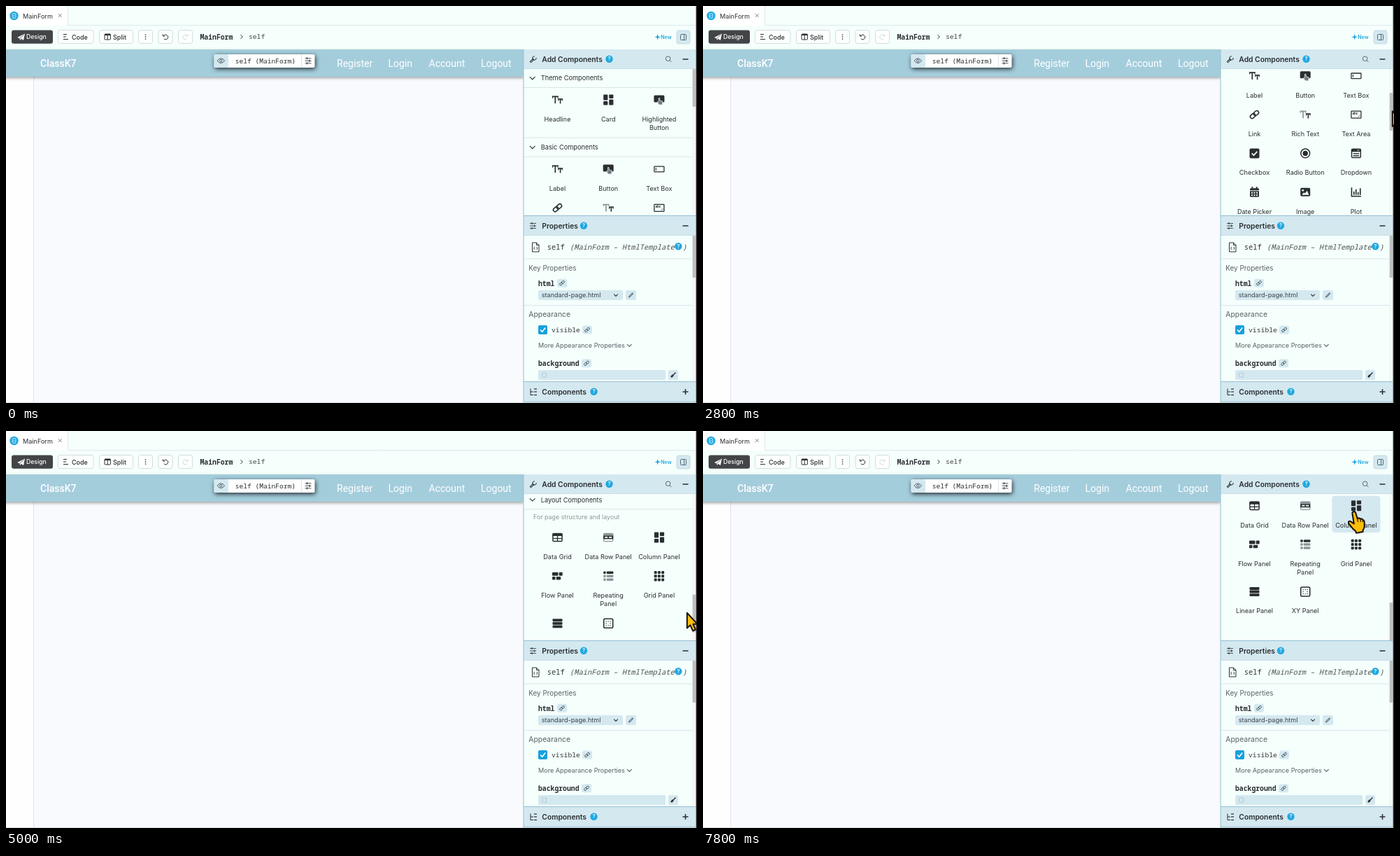
Animation of 988x567 px, one loop 8 s. Source, as an HTML page with a canvas:

```html
<!DOCTYPE html>
<html lang="en">
<head>
<meta charset="utf-8">
<title>Form designer</title>
<style>
html, body { margin: 0; width: 100%; height: 100%; overflow: hidden; background: #f9fafd; }
canvas { display: block; width: 988px; height: 567px; }
</style>
</head>
<body>
<canvas id="stage"></canvas>
<script>
const W = 988, H = 567, LOOP = 8000, STEP = 200;
const UI = 'Inter, sans-serif', MONO = '"Noto Sans Mono", monospace', SITE = 'Roboto, sans-serif';
const INK = '#2a2e31', PANEL = '#f5fffc', BLUE = '#d4e8f0', LINE = '#d9e6e8', ACCENT = '#1fa8e0';
const BORDER = '#93bfd1', GRAY = '#8d9598';
const canvas = document.getElementById('stage'), c = canvas.getContext('2d');
const dpr = window.devicePixelRatio || 1;
canvas.width = W * dpr;
canvas.height = H * dpr;

function box(x, y, w, h, fill, r = 0, stroke, lw = 1) {
  c.beginPath();
  c.roundRect(x, y, w, h, r);
  if (fill) { c.fillStyle = fill; c.fill(); }
  if (stroke) { c.strokeStyle = stroke; c.lineWidth = lw; c.stroke(); }
}

function line(points, color = INK, lw = 1) {
  c.beginPath();
  for (let i = 0; i < points.length; i += 2) c.lineTo(points[i], points[i + 1]);
  c.strokeStyle = color;
  c.lineWidth = lw;
  c.stroke();
}

function poly(points, fill) {
  c.beginPath();
  for (let i = 0; i < points.length; i += 2) c.lineTo(points[i], points[i + 1]);
  c.closePath();
  c.fillStyle = fill;
  c.fill();
}

function arc(x, y, r, from, to, lw, color = INK) {
  c.beginPath();
  c.arc(x, y, r, from, to);
  c.strokeStyle = color;
  c.lineWidth = lw;
  c.stroke();
}

function disc(x, y, r, fill) {
  c.beginPath();
  c.arc(x, y, r, 0, 7);
  c.fillStyle = fill;
  c.fill();
}

const ring = (x, y, r, lw, color) => arc(x, y, r, 0, 7, lw, color);

// y is the middle of the capitals
function text(s, x, y, size = 9.1, color = INK, font = UI, style = '', align = 'left') {
  c.font = `${style} ${size}px ${font}`;
  c.fillStyle = color;
  c.textAlign = align;
  c.fillText(s, x, y + size * 0.36);
}

function at(x, y, draw, angle = 0, scale = 1) {
  c.save();
  c.translate(x, y);
  c.rotate(angle);
  c.scale(scale, scale);
  draw();
  c.restore();
}

const chevron = (x, y, s = 4, color = INK) => line([x - s, y - s / 2, x, y + s / 2, x + s, y - s / 2], color, 1.1);

function help(x, y) {
  disc(x, y, 5.2, ACCENT);
  text('?', x, y, 7.5, '#fff', UI, '600', 'center');
}

function chain(x, y, scale, color = INK) {
  at(x, y, () => {
    box(-8, -3, 9, 6, null, 3, color, 1.8);
    box(-1, -3, 9, 6, null, 3, color, 1.8);
  }, -0.7, scale);
}

function linkBadge(x, y) {
  box(x - 7, y - 6, 14, 12, BLUE, 3);
  chain(x, y, 0.5, '#4a5860');
}

function sliders(x, y) {
  [-3.5, 0, 3.5].forEach((dy, i) => {
    line([x - 4.5, y + dy, x + 4.5, y + dy], '#3f474b', 0.9);
    const k = x + [-1.5, 2, -1.5][i];
    line([k, y + dy - 1.6, k, y + dy + 1.6], '#3f474b', 1.3);
  });
}

function letterT(x, y, w, h, t, color) {
  box(x, y, w, t, color);
  box(x, y, 1.1, t + 1.6, color);
  box(x + w - 1.1, y, 1.1, t + 1.6, color);
  box(x + (w - t) / 2, y, t, h, color);
}

function twoTs(first) {
  letterT(-7.5, -5.5, 8.6, 10.6, 1.7, first);
  letterT(0.8, -1.8, 6.6, 7.2, 1.6, INK);
}

const tiles = list => list.forEach(([x, y, w, h, color = INK]) => box(x, y, w, h, color, 1));

function table() {
  box(-6.6, -5.6, 13.2, 11.2, null, 1.5, INK, 1.5);
  box(-7, -6, 14, 4, INK, 1);
  line([-6, 1.5, 6, 1.5], INK, 1.3);
  line([0, -3, 0, 5], INK, 1.3);
}

function tableRow() {
  box(-6.6, -5.6, 13.2, 11.2, null, 1.5, GRAY, 1.3);
  box(-7, -6, 14, 3.2, GRAY, 1);
  box(-7, -2.6, 14, 5, INK);
  box(-5, -1, 4.2, 1.8, PANEL);
  box(0.8, -1, 4.2, 1.8, PANEL);
}

// Icons are drawn around the origin
const icons = {
  text: () => twoTs(INK),
  rich: () => twoTs(GRAY),
  card: () => tiles([[-7, -7.5, 6.2, 8], [-7, 2, 6.2, 5.5], [1, -7.5, 6.2, 5.5], [1, -0.5, 6.2, 8]]),
  button() {
    box(-7.5, -6.5, 15, 10, INK, 1.5);
    const hand = [-0.8, -2.5, 0.8, -2.5, 1.3, 1, 5, 2, 4.5, 7, 0, 7, -3, 3, -0.8, 3];
    poly(hand, '#737b7f');
    line([...hand, hand[0], hand[1]], '#dfe9e7', 0.8);
  },
  input() {
    box(-7, -3.8, 14, 7.6, null, 0.6, INK, 1.3);
    line([-4.5, -1.8, -4.5, 1.8], INK, 1.2);
  },
  link: () => chain(0, 0, 0.88),
  area() {
    box(-7, -5, 14, 10, null, 0.6, INK, 1.3);
    text('abc', -5.5, -1.5, 4.5, INK, UI, '700');
    line([3, 3.5, 5.5, 1], INK, 0.8);
  },
  check() {
    box(-7, -7, 14, 14, INK, 2);
    line([-3.8, 0, -1, 2.8, 3.8, -2.5], PANEL, 1.7);
  },
  radio() {
    ring(0, 0, 6.4, 1.5);
    disc(0, 0, 3.7, INK);
  },
  dropdown() {
    box(-6.4, -6, 12.8, 12.2, null, 1.5, INK, 1.5);
    box(-7, -6.7, 14, 4.6, INK, 1.5);
    line([1.5, -5, 3, -3.7, 4.5, -5], PANEL, 0.9);
    line([-4.2, 0.4, 4.2, 0.4], INK, 1.4);
    line([-4.2, 3.4, 4.2, 3.4], INK, 1.4);
  },
  date() {
    box(-6.5, -5.5, 13, 12.5, INK, 1.5);
    box(-4.2, -7.5, 2, 4, INK);
    box(2.2, -7.5, 2, 4, INK);
    line([-6.5, -2, 6.5, -2], PANEL, 1);
    for (let i = 0; i < 6; i++) box(-4.6 + i % 3 * 3.6, i < 3 ? 0 : 3.4, 2, 2, PANEL);
  },
  image() {
    box(-7, -6, 14, 12, INK, 1.8);
    disc(-3.5, -2.5, 1.4, PANEL);
    poly([-5, 4, -2, 0.5, -0.5, 2, 2.5, -2, 5.2, 4], PANEL);
  },
  plot() {
    line([-6.5, -6.5, -6.5, 6, 7, 6], INK, 1.6);
    [[-4, -1], [-1, -4], [2, 0], [5, -5.5]].forEach(([x, y]) => box(x, y, 1.7, 4 - y, INK));
  },
  video: () => box(-6, -6, 12, 12, INK),
  spacer() {
    line([-7.5, -6, 7.5, -6], INK, 1.7);
    line([-7.5, 6, 7.5, 6], INK, 1.7);
    line([0, -3.5, 0, 3.5], INK, 1.6);
    line([-2.8, -1.5, 0, -4, 2.8, -1.5], INK, 1.5);
    line([-2.8, 1.5, 0, 4, 2.8, 1.5], INK, 1.5);
  },
  shapes() {
    poly([0, -7.5, 4, -0.5, -4, -0.5], '#9aa1a4');
    disc(-3.5, 3.5, 3.4, GRAY);
    box(1, 0.5, 6.3, 6.3, INK, 0.8);
  },
  timer() {
    arc(0, 0, 6.4, -1.5, 4, 1.5);
    line([0, -6.5, 0, -3.5], INK, 1.4);
    line([-2.8, -2.8, 0.6, 0.6], INK, 1.8);
  },
  file() {
    box(-5, -6.5, 10, 13, null, 1, INK, 1.4);
    line([0, 4, 0, -2], INK, 1.4);
    line([-2.5, 0, 0, -2.5, 2.5, 0], INK, 1.4);
  },
  grid: table,
  row: tableRow,
  flow: () => tiles([[-7.5, -5.5, 8.5, 5], [2.2, -5.5, 5, 5], [-7.5, 0.8, 4.5, 4.5], [-1.8, 0.8, 6.5, 4.5]]),
  repeat() {
    [-5, 0, 5].forEach((y, i) => {
      const tone = i ? GRAY : INK;
      tiles([[-7, y - 1.8, 3.5, 3.6, tone], [-2.4, y - 1.8, 9.6, 3.6, tone]]);
    });
  },
  cells() {
    for (let i = 0; i < 9; i++) box(-7.2 + i % 3 * 5.2, -7.2 + Math.floor(i / 3) * 5.2, 4, 4, INK, 1);
  },
  rows: () => tiles([-6.5, -1.9, 2.7].map(y => [-7, y, 14, 3.9])),
  xy() {
    box(-6.5, -6.5, 13, 13, null, 1.5, INK, 1.6);
    for (let i = 0; i < 9; i++) if (i !== 4) disc((i % 3 - 1) * 3, (Math.floor(i / 3) - 1) * 3, 0.65, INK);
  }
};

// Heading position, then rows of [icon position, label offset, items]
const sections = [
  ['Theme Components', 103, [[134, 28, 'text:Headline', 'card:Card', 'button:Highlighted|Button']]],
  ['Basic Components', 201.7, [
    [233, 27.5, 'text:Label', 'button:Button', 'input:Text Box'],
    [288.3, 27.5, 'link:Link', 'rich:Rich Text', 'area:Text Area'],
    [343.6, 27.5, 'check:Checkbox', 'radio:Radio Button', 'dropdown:Dropdown'],
    [399, 27.5, 'date:Date Picker', 'image:Image', 'plot:Plot'],
    [454.3, 27.5, 'file:File Loader']]],
  ['More Components', 520.3, [
    [552, 27.3, 'video:ClipNub Video', 'spacer:Spacer', 'shapes:Canvas'],
    [607, 27.3, 'timer:Timer']]],
  ['Layout Components', 662, [
    [715.8, 27.7, 'grid:Data Grid', 'row:Data Row Panel', 'card:Column Panel'],
    [771, 27.7, 'flow:Flow Panel', 'repeat:Repeating|Panel', 'cells:Grid Panel'],
    [838.5, 27.7, 'rows:Linear Panel', 'xy:XY Panel']]]
];
const items = sections.flatMap(s => s[2].flatMap(([y, gap, ...cells]) => cells.map((cell, i) => {
  const [icon, label] = cell.split(':'), words = label.split('|');
  return { icon, words, x: 788.5 + i * 72.7, y, gap, end: y + gap + 10.5 + (words.length - 1) * 12 };
})));

// Pointer path: time, x, y
const path = [
  [0, 1010, 330], [200, 1000, 300], [800, 944, 158], [1000, 938.5, 150.5], [1400, 936, 148],
  [2000, 982, 117], [2200, 985, 115.5], [2800, 985, 149.4], [4200, 978, 223.7], [5000, 973, 259],
  [5200, 973, 270.5], [5400, 972, 271], [6000, 900, 200], [6600, 862, 196], [6800, 810, 146],
  [7000, 810, 146], [7800, 931, 115.5], [8000, 931, 115.5]
];
const MAX = 609, TRAVEL = 155;

function pointer(t) {
  const i = path.findIndex(p => p[0] > t), [t0, x0, y0] = path[i - 1], [t1, x1, y1] = path[i];
  const k = (t - t0) / (t1 - t0);
  return { x: x0 + (x1 - x0) * k, y: y0 + (y1 - y0) * k };
}

function scrollAt(t, y) {
  if (t < 2200) return 0;
  if (t >= 5200) return MAX;
  return Math.min(MAX, Math.max(0, (y - 115.5) * MAX / TRAVEL));
}

function toolButton(x, w, label, textX) {
  box(x, 34.5, w, 19, '#fdfffe', 3, '#d5dcde');
  if (label) text(label, textX, 44.3, 9, INK, UI, '500');
}

function drawTop() {
  box(0, 0, W, 62, PANEL);
  box(0, 0, 88, 28, '#fefffe');
  line([88.5, 0, 88.5, 27.5, W, 27.5], '#dfe8ea');
  disc(11.5, 14, 6.2, ACCENT);
  box(9.3, 10.7, 4.6, 6.4, null, 0.8, '#d9f3ff', 0.9);
  line([10.4, 14, 12.8, 14], '#d9f3ff', 0.7);
  text('MainForm', 24, 14.3);
  line([75, 11.3, 79.6, 15.9], '#697276', 0.9);
  line([79.6, 11.3, 75, 15.9], '#697276', 0.9);

  box(8, 34.5, 59, 19.2, '#424547', 3);
  text('Design', 29, 44.3, 8.7, '#fff', UI, '500');
  poly([16, 45, 27, 39.5, 25, 49, 21.5, 46.8, 20, 49.2, 19.6, 46.3], '#fff');
  line([20, 46.2, 25.5, 41], '#424547', 0.8);
  toolButton(74.5, 50.5, 'Code', 94);
  [[-3.5, 5], [0, 4], [3.5, 7]].forEach(([dy, w]) => line([82, 44 + dy, 82 + w, 44 + dy], INK, 1));
  toolButton(133.5, 48, 'Split', 153);
  box(141, 40.2, 8.4, 7.8, null, 0.8, INK, 1);
  box(141, 39.8, 8.4, 2.2, INK, 0.8);
  line([145.2, 41, 145.2, 48], INK, 1);
  toolButton(189.5, 20);
  [-3, 0, 3].forEach(dy => disc(199.5, 44 + dy, 0.85, INK));
  [[218, INK, 1], [246.5, '#d3dbdd', -1]].forEach(([x, color, dir]) => {
    toolButton(x, 20);
    at(x + 10, 44.3, () => {
      c.scale(dir, 1);
      arc(0.3, 0.2, 3.4, -2.6, 2.4, 1, color);
      line([-3.6, -4, -3.6, -1.3, -0.8, -1.3], color, 1);
    });
  });
  text('MainForm', 277.5, 44, 9.75, INK, MONO, '600');
  line([335.5, 41.2, 338.3, 44, 335.5, 46.8], INK, 1);
  text('self', 347, 44, 9.7, '#44494c', MONO);

  const spark = [];
  for (let i = 0; i < 8; i++) {
    const r = i % 2 ? 1.5 : 4.2, a = i * Math.PI / 4;
    spark.push(931.7 + r * Math.cos(a), 44.3 + r * Math.sin(a));
  }
  poly(spark, ACCENT);
  text('New', 936.3, 44.5, 7, ACCENT, UI, '600');
  box(959, 35, 19, 19, BLUE, 3, '#c2d9e2');
  box(964.5, 40.5, 8, 8, null, 1, '#526b76', 1);
  line([969.5, 40.5, 969.5, 48.5], '#526b76');
}

function shadow(color, blur, dx, dy, draw) {
  c.save();
  c.shadowColor = color;
  c.shadowBlur = blur * dpr;
  c.shadowOffsetX = dx * dpr;
  c.shadowOffsetY = dy * dpr;
  draw();
  c.restore();
}

function drawPage() {
  box(0, 62, 740, 505, '#f9fafd');
  box(0, 62, 39, 505, '#fefefe');
  line([39.5, 100, 39.5, H], '#dfe2e7');
  shadow('rgba(0,0,0,.35)', 4, 0, 1.5, () => box(-5, 62, 745, 39, '#a4cddc'));
  text('ClassK7', 49, 81.7, 14, '#fff', SITE, '500');
  [['Register', 473], ['Login', 546.5], ['Account', 604.5], ['Logout', 679]]
    .forEach(([s, x]) => text(s, x, 81.7, 14, '#fff', SITE));

  shadow('rgba(0,0,0,.8)', 6, 1, 2, () => box(297.5, 69, 144, 19, '#fff', 2));
  box(297.5, 69, 20.5, 19, BLUE, 2);
  line([422.5, 69, 422.5, 88], '#dce5e8');
  c.beginPath();
  c.moveTo(302, 78.2);
  c.quadraticCurveTo(307.3, 71.5, 312.6, 78.2);
  c.quadraticCurveTo(307.3, 84.9, 302, 78.2);
  c.strokeStyle = '#4c5d65';
  c.lineWidth = 1;
  c.stroke();
  ring(307.3, 78.2, 1.7, 1, '#4c5d65');
  text('self (MainForm)', 327.7, 78.3, 9.6, INK, MONO);
  sliders(432, 78.3);
}

function panelHead(y, title, helpX, open) {
  box(740, y, 246, 28, BLUE);
  line([740, y + 27.5, 986, y + 27.5], '#c9dee6');
  text(title, 766.3, y + 14, 10.3, INK, UI, '600');
  help(helpX, y + 13.7);
  line([967.5, y + 14, 975.5, y + 14], INK, 1.5);
  if (!open) line([971.5, y + 10, 971.5, y + 18], INK, 1.5);
}

function scrollbar(top, thumbTop, thumbHeight) {
  box(981, top, 5, 209, '#f3f8f7');
  box(981.7, thumbTop, 4.3, thumbHeight, '#bdbfc1', 1);
}

function drawItem(it, hot) {
  if (hot) box(it.x - 34.5, it.y - 14, 69, it.end - it.y + 14, BLUE, 4);
  at(it.x, it.y, icons[it.icon]);
  it.words.forEach((word, i) => text(word, it.x, it.y + it.gap + i * 12, 9.1, INK, UI, '', 'center'));
}

function drawToolbox(scroll, hot) {
  c.save();
  c.beginPath();
  c.rect(740, 90, 246, 209);
  c.clip();
  box(740, 90, 246, 209, PANEL);
  c.translate(0, -scroll);
  for (const [title, y] of sections) {
    line([740, y - 13.7, 981, y - 13.7], LINE);
    line([740, y + 13.5, 981, y + 13.5], LINE);
    chevron(752.7, y, 3.8);
    text(title, 764.7, y, 9.25);
  }
  text('For page structure and layout', 754, 687, 8.9, '#8d9799');
  items.forEach(it => drawItem(it, it === hot));
  c.restore();
  scrollbar(90, 90 + scroll * TRAVEL / MAX, 54);
  panelHead(62, 'Add Components', 862.5, true);
  at(753.5, 76.5, () => {
    line([-4, 4, 1, -1], INK, 2.6);
    line([-4, 4, 1, -1], BLUE, 0.9);
    arc(2, -2, 2.7, -0.2, 4.9, 1);
  });
  ring(946.6, 75.2, 3.3, 0.9, '#50595d');
  line([949, 77.6, 951.5, 80.1], '#50595d', 0.9);
}

function drawProperties() {
  box(740, 299, 246, 268, PANEL);
  panelHead(300, 'Properties', 826, true);
  sliders(753.5, 314);

  line([758.5, 338, 752.5, 338, 752.5, 351, 762, 351, 762, 341.5, 758.5, 338, 758.5, 341.5, 762, 341.5]);
  line([756, 344, 754.5, 346, 756, 348], INK, 0.9);
  line([758.5, 344, 760, 346, 758.5, 348], INK, 0.9);
  text('self', 773.7, 344.3, 10.4, '#33383b', MONO);
  text('(MainForm – HtmlTemplate', 806, 344.3, 10.4, '#4b5255', MONO, 'italic');
  help(961.3, 343.3);
  text(')', 967.3, 344.3, 10.4, '#4b5255', MONO, 'italic');
  line([740, 361, 981, 361], LINE);

  text('Key Properties', 747.3, 374.3, 9.9, '#5a6265');
  text('html', 761, 396, 9.75, INK, MONO, '600');
  linkBadge(795, 395.7);
  box(761, 406, 121, 14, BLUE, 2);
  text('standard-page.html', 765.7, 413, 9.1, '#3b4347');
  chevron(872, 413, 2.8);
  box(886, 406, 15, 14, BLUE, 2);
  line([890.5, 416, 896.5, 410], '#4a5860', 2.4);
  line([891, 415.5, 896, 410.5], BLUE, 0.9);
  line([740, 427.5, 981, 427.5], LINE);

  text('Appearance', 747.3, 440.7, 10.4, '#5a6265');
  box(761, 456, 13, 13, '#17a0dc', 2);
  line([764, 462.5, 766.7, 465.2, 771.2, 459.5], '#fff', 1.6);
  text('visible', 780, 462.6, 9.75, '#33383b', MONO);
  linkBadge(831, 462.5);
  text('More Appearance Properties', 761, 484.7, 9.1, '#5a6265');
  chevron(891.3, 484.8, 3.3, '#5a6265');
  text('background', 761, 510.3, 9.75, INK, MONO, '600');
  linkBadge(830, 510.2);
  box(761, 520, 182, 14, BLUE, 2);
  box(766.5, 524, 6, 6, null, 0.5, '#aec6d0', 0.9);
  box(947, 520, 14, 14, BLUE, 2);
  line([951, 530, 954, 527], INK, 2.6);
  line([954, 527, 957.5, 523.5], INK, 1.5);
  scrollbar(328, 328, 60);

  panelHead(537, 'Components', 840.5, false);
  line([750, 546.5, 750, 555.5, 754, 555.5]);
  line([750, 551, 754, 551]);
  [547, 551, 555.5].forEach(y => line([755, y, 759, y], INK, 1.2));
}

function drawEdges() {
  line([0, 566.5, 987, 566.5], '#d5dcdf');
  [299.5, 536.5, 565.8].forEach(y => line([740, y, 986, y], BORDER));
  line([740, 62, 740, 566], BORDER);
  box(986, 0, 1, H, '#dce8e8');
  box(986.7, 0, 1.3, H, '#24191f');
}

const arrowShape = new Path2D('M.8 .8V22.5L5.4 18.3L9.1 26.4L13 24.7L9.4 16.8H15.6Z');
const handShape = new Path2D('M-2.7 1.6Q-1.2-2 2 .8L4.6 9.5Q7 8 8.8 10Q11 9.2 12.4 11.4Q14.3 11.6 14.6 14' +
  'L14.8 20Q14.6 24 12.6 26V28.4L3 30.2L2.2 27.5Q-2 24.6-4.3 21L-8 16.5Q-8.8 13-5.5 13.4L-.2 17Z');

function drawPointer({ x, y }, hand) {
  at(x, y, () => {
    const shape = hand ? handShape : arrowShape;
    c.lineJoin = 'round';
    c.strokeStyle = '#191008';
    c.lineWidth = 2;
    c.fillStyle = '#fcbd0b';
    c.fill(shape);
    c.stroke(shape);
    if (hand) {
      line([4.7, 9.8, 5.6, 14.5], '#191008', 1.2);
      line([8.8, 10.3, 9.5, 14.3], '#191008', 1.2);
      line([12.3, 11.8, 12.5, 14.5], '#191008', 1.2);
    }
  });
}

function draw(t) {
  const p = pointer(t), scroll = scrollAt(t, p.y);
  const inside = p.y > 90 && p.y < 299;
  const hot = inside && items.find(it => Math.abs(p.x - it.x) < 34.5 &&
    p.y + scroll > it.y - 14 && p.y + scroll < it.end);
  c.setTransform(dpr, 0, 0, dpr, 0, 0);
  c.lineJoin = 'miter';
  drawTop();
  drawPage();
  drawToolbox(scroll, hot);
  drawProperties();
  drawEdges();
  drawPointer(p, hot);
}

function tick() {
  const t = performance.now() % LOOP;
  draw(Math.floor(t / STEP) * STEP);
  requestAnimationFrame(tick);
}
tick();
</script>
</body>
</html>
```
